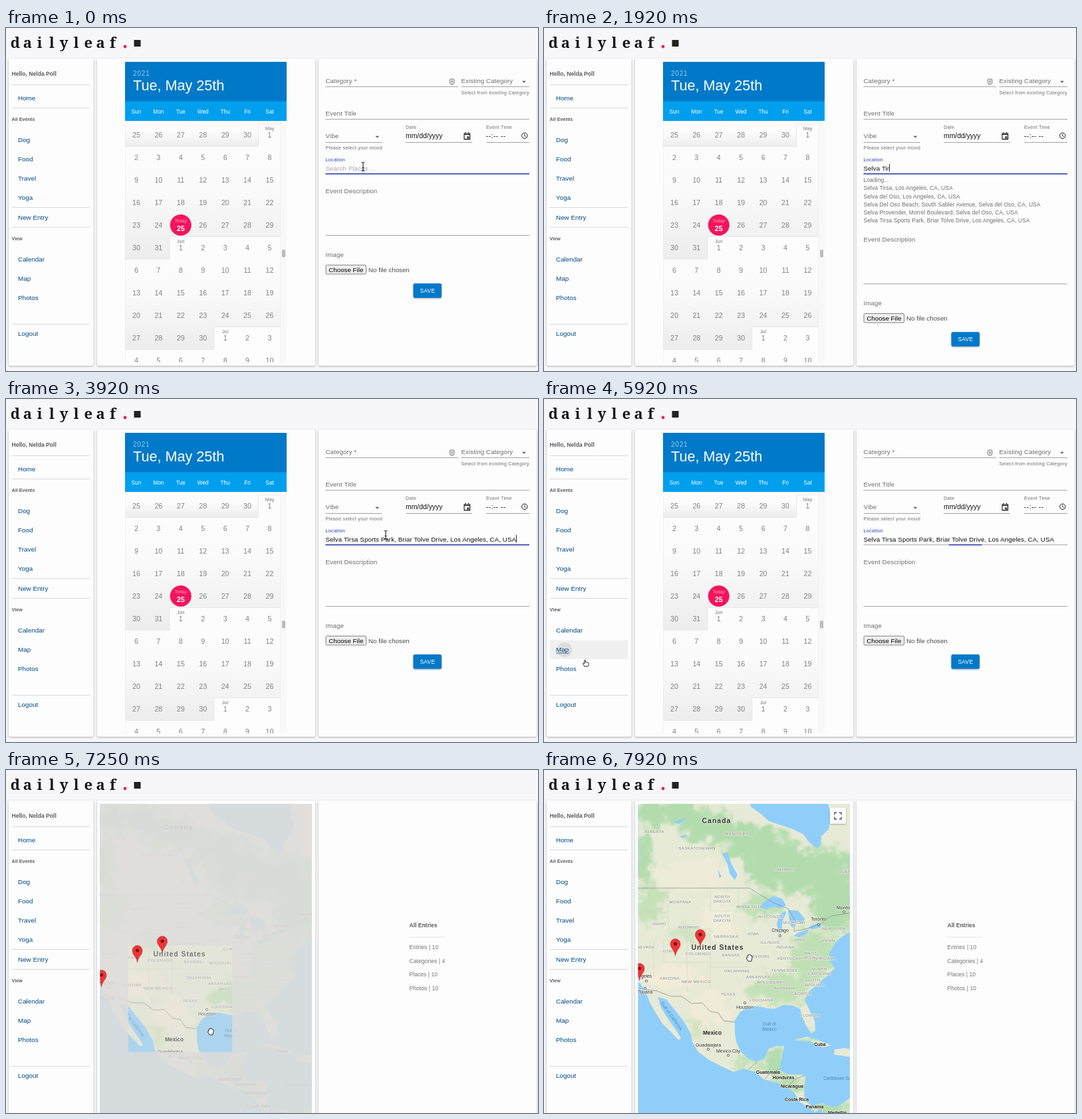
These frames come from a looping animation (800x517 px, 8 s). An HTML page:

```html
<!DOCTYPE html>
<html lang="en">
<head>
<meta charset="utf-8">
<title>Event diary</title>
<style>
html, body { margin: 0; width: 100%; height: 100%; overflow: hidden; background: #f7f7f9; }
svg { display: block; width: 100vw; height: 100vh; font-family: "Liberation Sans", Arial, sans-serif; }
text { white-space: pre; }
.panel { fill: #fdfdfe; filter: drop-shadow(0 1px 1.5px rgba(0,0,0,.3)); }
.halo text { paint-order: stroke; stroke: #f4f5e8; stroke-opacity: .75; stroke-width: 1.6px; stroke-linejoin: round; }
.body { letter-spacing: .0094em; }
.help { letter-spacing: .033em; }
</style>
</head>
<body>
<svg id="stage" viewBox="0 0 800 517" preserveAspectRatio="none"></svg>
<script>
const GREY = '#6e6e70', LINK = '#004a80', BLUE = '#0079c8', FOCUS = '#303fb0', SEA = '#90cefa';

// ---------- drawing helpers ----------
const text = (x, y, s, size, fill = GREY, extra = '') =>
  `<text x="${x}" y="${y}" font-size="${size}" fill="${fill}" ${extra}>${s}</text>`;
const rect = (x, y, w, h, fill, extra = '') =>
  `<rect x="${x}" y="${y}" width="${w}" height="${h}" fill="${fill}" ${extra}/>`;
const line = (x1, x2, y, stroke = '#8e8e8e', w = .8) =>
  `<path d="M${x1} ${y}H${x2}" stroke="${stroke}" stroke-width="${w}"/>`;
const path = (d, fill = 'none', extra = '') => `<path d="${d}" fill="${fill}" ${extra}/>`;
const group = (id, s, extra = '') => `<g id="${id}" ${extra}>${s}</g>`;
const body = (x, y, s, fill = GREY) => text(x, y, s, 9.73, fill, 'class="body"');
const help = (x, y, s, extra = '') => text(x, y, s, 7.3, GREY, 'class="help" ' + extra);
const MID = 'text-anchor="middle"', BOLD = 'font-weight="700"';

// ---------- header and side menu ----------
function header() {
  const word = [...'dailyleaf'].map((c, i) =>
    text(14 + 18.3 * i, 30, c, 22, '#161616', `${MID} ${BOLD} font-family="Noto Serif, serif"`)).join('');
  return word + '<circle cx="179" cy="28" r="2.4" fill="#f0204f"/>' + rect(192.5, 18, 10, 10, '#222');
}

function menu() {
  const links = { Home: 108.5, Dog: 171.5, Food: 200.8, Travel: 230, Yoga: 259.2, 'New Entry': 288.7,
    Calendar: 352, Map: 381.2, Photos: 410.3, Logout: 464.3 };
  return rect(8.5, 363.5, 118, 28.5, '#000', 'id="mapRow"') + rect(8.5, 392, 118, 34, '#000', 'id="photoRow"') +
    '<circle id="ripple" cx="31" cy="378" fill="#000"/>' +
    text(8.5, 71.7, 'Hello, Nelda Poll', 8.6, '#5c5c5e', BOLD) +
    text(8.5, 140.3, 'All Events', 7.2, '#5c5c5e', BOLD) + text(8.5, 320, 'View', 7.2, '#5c5c5e', BOLD) +
    [85.5, 120.5, 270.5, 300.5, 446.5].map(y => line(8.5, 126.5, y, '#d9d9db', 1)).join('') +
    Object.entries(links).map(([s, y]) => text(18, y, s, 9.9, LINK)).join('') +
    group('mapLine', line(18, 37.5, 383, LINK));
}

// ---------- calendar ----------
function calendar() {
  const col = c => 179 + 33.43 * c, mid = c => col(c) + 16.9, row = r => 144.5 + 34 * r;
  const L = 179, R = 413, B = 504;
  const shapes = [
    `M${L} 140H${R}V${row(0)}H${col(6)}V${row(1)}H${L}Z`,
    `M${col(6)} ${row(0)}H${R}V${row(5)}H${col(2)}V${row(6)}H${L}V${row(1)}H${col(6)}Z`,
    `M${col(2)} ${row(5)}H${R}V${row(9)}H${col(4)}V${row(10)}H${L}V${row(6)}H${col(2)}Z`,
    `M${col(4)} ${row(9)}H${R}V560H${L}V${row(10)}H${col(4)}Z`];
  let s = shapes.map((d, i) => path(d, i < 3 ? 'url(#month)' : '#fdfdfe', 'stroke="#e6e6e8" stroke-width=".8"')).join('');
  for (let i = 0; i < 77; i++) {
    const r = i / 7 | 0, c = i % 7, d = new Date(2021, 3, 25 + i), y = row(r) + 17;
    if (i == 30) {
      s += `<circle cx="${mid(c)}" cy="${y - .5}" r="16" fill="#f5145c"/>` +
        text(mid(c), y - 5, 'Today', 6.8, '#ff9dbb', MID) + text(mid(c), y + 8, 25, 10.8, '#fff', `${MID} ${BOLD}`);
      continue;
    }
    if (d.getDate() == 1) s += text(mid(c), y - 8, ['May', 'Jun', 'Jul'][d.getMonth() - 4], 7.2, '#777', MID);
    s += text(mid(c), y + 3.8, d.getDate(), 10.7, '#818183', MID);
  }
  const days = ['Sun', 'Mon', 'Tue', 'Wed', 'Thu', 'Fri', 'Sat'];
  return `<g clip-path="url(#calClip)">${s}${rect(R, 140, 9, B - 140, '#f8f8f9')}</g>` +
    rect(415, 334, 5, 11.5, '#bcbcbe', 'rx="1.5"') +
    rect(L, 51, 243, 60, BLUE, 'rx="1"') + rect(L, 110.5, 243, 29.5, '#009fee') +
    text(191, 72.3, 2021, 10, '#9accec', 'letter-spacing=".8"') + text(191, 94, 'Tue, May 25th', 21.6, '#fff') +
    days.map((d, i) => text(mid(i), 129, d, 8.3, '#fff', MID)).join('');
}

// ---------- entry form ----------
const PLACE = 'Selva Tirsa Sports Park, Briar Tolve Drive, Los Angeles, CA, USA';
const HINTS = ['Selva Tirsa, Los Angeles, CA, USA', 'Selva del Oso, Los Angeles, CA, USA',
  'Selva Del Oso Beach, South Sabler Avenue, Selva del Oso, CA, USA',
  'Selva Provender, Morrel Boulevard, Selva del Oso, CA, USA', PLACE];
const LINE = 12.2;

function form() {
  const arrow = (x, y) => path(`M${x - 3} ${y - 1.5}h6l-3 3z`, '#666');
  const hint = (s, i) => text(480.5, 244.5 - LINE + LINE * i, s, 8.5, GREY, 'letter-spacing=".07"');
  return body(480.5, 83, 'Category *') + line(480.5, 680, 88.5) +
    rect(667.7, 77, 6, 7.5, 'none', 'rx="1" stroke="#666"') + rect(670, 79, 1.4, 3.6, '#666') +
    body(684.5, 83, 'Existing Category') + line(684.5, 787, 88.5) + arrow(779, 81.3) +
    help(684.5, 99.8, 'Select from existing Category') +
    body(480.5, 131.5, 'Event Title') + line(480.5, 787, 137.5) +
    body(480.5, 166, 'Vibe') + line(480.5, 565.5, 172.5) + arrow(558.3, 164.3) +
    help(480.5, 183, 'Please select your mood') +
    help(601, 152, 'Date') + text(601, 166, 'mm/dd/yyyy', 10.4, '#111') + line(601, 701, 172.5) +
    path('M689 159h8.6v8.6h-8.6zM689 160.5h8.6M691 157v2M695.6 157v2M693.8 164h2v2h-2z', 'none', 'stroke="#111" stroke-width="1.1"') +
    help(722, 152, 'Event Time') + text(722, 165.5, '--:-- --', 10, '#111', 'letter-spacing=".5"') + line(722, 787, 172.5) +
    '<circle cx="779.8" cy="162.3" r="4.2" fill="none" stroke="#111"/>' +
    path('M779.8 159.8v2.8l1.9 1.2', 'none', 'stroke="#111" stroke-width=".9"') +
    help(480.5, 200.5, 'Location', 'id="label"') + line(480.5, 787, 219.8) +
    rect(-153.25, -.75, 306.5, 1.5, FOCUS, 'id="focus"') +
    group('input', body(480.5, 214.5, '')) + rect(0, 205, .9, 11.5, '#111', 'id="caret"') +
    group('loading', hint('Loading...', 0)) + group('list', HINTS.map((s, i) => hint(s, i)).join('')) +
    group('low', body(480.5, 249, 'Event Description') + line(480.5, 787, 312.5) +
      body(480.5, 344.5, 'Image') + rect(481, 357.3, 60.5, 13.6, '#efefef', 'rx="1.5" stroke="#666" stroke-width=".8"') +
      text(485.3, 367.6, 'Choose File', 9.75, '#000') + text(545, 367.6, 'No file chosen', 9.75, '#4a4a4a') +
      rect(612.5, 385, 42.5, 21.8, BLUE, 'rx="2.4" style="filter:drop-shadow(0 1px 1px rgba(0,0,0,.35))"') +
      text(633.9, 399, 'SAVE', 8.5, '#fff', MID + ' letter-spacing=".2"'));
}

// ---------- map ----------
const LAND = 'M130 40H304L312 56 326 66 338 77 356 83 374 89 390 97 398 108 410 118 416 114 417 100 428 89 432 70 424 40H470V238L448 251 438 260 ' +
  '429 276 430 288 437 299 425 311 410 324 398 334 392 346 399 362 407 378 408 393 402 397 394 385 388 371 385 360 374 355 360 354 ' +
  '347 360 335 359 322 356 308 356 295 365 287 377 287 396 289 410 296 425 308 436 320 440 332 435 338 420 350 416 361 416 ' +
  '358 430 354 451';
const SOUTH = 'L364 458 393 460 391 488 393 499 403 507 418 502 433 508 442 507 470 488V540H425L418 510 408 516 398 508 384 500 ' +
  '377 487 366 477 345 470 330 466 318 455 300 450 285 455 268 447 250 438 232 425 223 410 221 398 211 380 197 362 184 346 ' +
  '171 342 176 358 187 376 199 393 206 404 202 407 192 396 178 382 168 366 160 352 153 335 145 322 130 312Z' +
  'M376 407L395 402 412 407 432 415 419 418 400 409ZM437 421L454 419 470 424V434L436 429Z';
const LAKES = 'M322 208L332 198 345 190 358 194 364 204 355 209 345 206 334 210ZM353 247L350 232 353 220 362 212 364 216 358 230 358 245Z' +
  'M367 211L382 212 392 224 388 234 380 226 374 238 370 233ZM375 250L383 245 398 240 396 246 384 252ZM397 238L405 233 418 231 416 237 404 240Z' +
  'M268 126L276 124 281 140 291 158 287 166 279 156 276 142ZM261 150L267 160 264 163ZM196 78L216 71 202 82ZM204 100L216 97 209 103Z';
const STATES = 'ALBERTA 166 95;MANITOBA 290 98;SASKATCHEWAN 230 120;ONTARIO 362 152;QUEB 452 155;MONTANA 205 201;NORTH 268 193;' +
  'DAKOTA 268 200;SOUTH 268 222;DAKOTA 268 229;MINNESOTA 309 208;WISCONSIN 341 223;IDAHO 173 234;WYOMING 218 239;' +
  'NEBRASKA 274 253;IOWA 315 249;MICHIGAN 376 232;ILLINOIS 340 262;OHIO 385 258;PENN 428 259;NEW YORK 436 241;NEVADA 153 269;' +
  'UTAH 188 275;COLORADO 232 279;KANSAS 281 281;MISSOURI 322 283;INDIANA 363 269;WEST 401 278;VIRGINIA 401 285;KENTUCKY 369 286;' +
  'VIRGINIA 423 286';
const STATES2 = 'ARIZONA 189 316;NEW MEXICO 229 321;OKLAHOMA 290 305;ARKANSAS 322 314;TENNESSEE 362 304;NORTH 414 302;' +
  'CAROLINA 414 309;MISSISSIPPI 341 322;ALABAMA 362 331;SOUTH 404 319;CAROLINA 404 326;GEORGIA 387 339;TEXAS 277 340;' +
  'LOUISIANA 327 349;FLORIDA 400 372';
const CITIES = 'Chicago 355 244 6;Toronto 413 227 6;Montre 451 210 4;Houston 302 360 -9;Mexico City 277 426 4;Guadalajara 247 417 4;' +
  'Tijuana 152 337 -8;geles 154 313 5';
const NATIONS = 'Cuba 415 416;Guatemala 337 458;Honduras 360 466;Nicaragua 373 479;Costa Rica 380 499;Panama 407 510;Medellín 441 519';

// Each entry reads "name x y [dot offset]".
const places = (list, draw) => list.split(';').map(e => {
  const [, name, x, y, dot] = e.match(/^(\D+) (\d+) (\d+) ?(-?\d+)?$/);
  return draw(name, +x, +y, dot);
}).join('');

function pin(x, y) {
  return path(`M${x} ${y}C${x - 1} ${y - 9} ${x - 7.5} ${y - 11} ${x - 7.5} ${y - 18}a7.5 7.5 0 0 1 15 0C${x + 7.5} ${y - 11} ${x + 1} ${y - 9} ${x} ${y}Z`,
    '#ee3436', 'stroke="#c4282a" stroke-width=".6"') + `<circle cx="${x}" cy="${y - 18}" r="2.6" fill="#7d1214"/>`;
}

function map() {
  const blob = (x, y, rx, ry, fill = '#b3dcae') => `<ellipse cx="${x}" cy="${y}" rx="${rx}" ry="${ry}" fill="${fill}"/>`;
  const greens = blob(185, 62, 60, 20) + blob(255, 88, 50, 20) + blob(320, 112, 55, 26) + blob(390, 150, 85, 36) +
    blob(150, 130, 14, 45) + blob(160, 205, 20, 30, '#c6e1b8') + blob(440, 205, 40, 40) + blob(330, 205, 26, 18, '#c0e0b6') +
    blob(405, 280, 38, 38, '#bfe0b5') + blob(355, 330, 48, 22, '#c3e1b7') + blob(215, 250, 25, 14, '#d0e4c2') +
    blob(228, 388, 12, 26, '#d3e3be') + blob(350, 440, 25, 18) + blob(372, 475, 28, 16) + blob(310, 443, 28, 10, '#c3e0b5') +
    blob(430, 512, 35, 14) + blob(392, 408, 30, 6) +
    blob(225, 158, 58, 24, '#eeecd9') + blob(265, 225, 30, 30, '#f0edda') + blob(195, 312, 45, 22, '#f1ebd8') + blob(252, 360, 26, 28, '#f0ebd8');
  const state = (s, x, y) => text(x, y, s, 6.2, '#82868a', `${MID} letter-spacing=".35"`);
  const city = (s, x, y, dot) => text(x, y, s, 7, '#333', MID) +
    `<circle cx="${x}" cy="${y + +dot}" r="1.6" fill="#fff" stroke="#444" stroke-width=".8"/>`;
  const sea = (x, y, s, extra = '') => text(x, y, s, 6.8, '#4e86b8', `${MID} ${extra}`);
  return rect(130, 40, 340, 500, SEA) +
    `<clipPath id="landClip">${path(LAND + SOUTH)}</clipPath>` +
    `<g clip-path="url(#landClip)">${rect(130, 40, 340, 500, '#e7ead6')}<g filter="url(#terrain)">${greens}</g></g>` +
    path(LAKES, SEA) +
    path('M130 178H309L325 188 345 200 367 209 378 228 376 243 396 239 416 232 432 220 470 214', 'none', 'stroke="#8d9290" stroke-width=".8"') +
    path('M153 331L170 333 190 341 207 341 222 352 238 351 250 364 262 366 270 378 287 380M308 451L320 440M332 466L340 457 354 451M366 477L378 466 393 460', 'none', 'stroke="#8d9290" stroke-width=".8"') +
    path('M142 214H187V240H250M187 178V214M250 178V212H292V178M250 240V290M215 250V335M180 255V290H300M165 255V310M250 290V330M250 297H312', 'none', 'stroke="#d2d4c4" stroke-width=".6"') +
    `<g class="halo">${places(STATES, state)}${places(STATES2, state)}${places(CITIES, city)}` +
    places(NATIONS, (s, x, y) => text(x, y, s, 7, '#222', `${MID} ${BOLD}`)) +
    text(259.5, 79.5, 'Canada', 10.5, '#333', `${MID} ${BOLD} letter-spacing="1"`) +
    text(261, 270.5, 'United States', 10.5, '#333', `${MID} ${BOLD} letter-spacing=".9"`) +
    text(253, 399, 'Mexico', 8.3, '#222', `${MID} ${BOLD}`) + '</g>' +
    sea(190, 372, 'Gulf of California', 'transform="rotate(54 190 372)"') +
    sea(339, 385, 'Gulf of') + sea(339, 393, 'Mexico') + sea(441, 467, 'Caribbean Se');
}

function mapPage() {
  return `<g id="mapPane" clip-path="url(#mapClip)">${group('land', map())}` +
    path('M142 51H460V517H142ZM184 265V425H340V265Z', '#dedddb', 'id="veil" fill-rule="evenodd"') +
    rect(184, 265, 156, 160, '#dedddb', 'id="tile"') +
    group('pins', pin(197.5, 280) + pin(235, 266) + pin(143.5, 317)) +
    group('full', rect(430, 57, 24, 24, '#fff', 'rx="1.5" style="filter:drop-shadow(0 1px 1px rgba(0,0,0,.3))"') +
      path('M437 67.5V64.3h3.2M443.8 64.3H447v3.2M447 70.8V74h-3.2M440.2 74H437v-3.2', 'none', 'stroke="#555" stroke-width="1.5"')) + '</g>' +
    text(606.5, 237.3, 'All Entries', 8.5, '#5f5f61', BOLD) + line(606, 660, 252, '#e6e6e8', 1) +
    ['Entries | 10', 'Categories | 4', 'Places | 10', 'Photos | 10'].map((s, i) =>
      text(606.5, 270.2 + 20.6 * i, s, 8.5, '#747476', 'letter-spacing=".07"')).join('');
}

// ---------- pointers, centred on their middle ----------
const outline = 'stroke="#111" stroke-width=".9" stroke-linejoin="round"';
const POINTERS = {
  beam: path('M-2.5-6.5Q0-6.5 0-5V5Q0 6.5-2.5 6.5M2.5-6.5Q0-6.5 0-5M0 5Q0 6.5 2.5 6.5M-1.5 1.5H1.5', 'none', 'stroke="#222" stroke-width="1.1"'),
  arrow: path('M-3-6V5L-.6 2.8 1 6.4 2.7 5.6 1.2 2.2H4.5Z', '#111', 'stroke="#fff" stroke-width=".7"'),
  hand: path('M-2.2 5L-4.4 1.2Q-4.6-.2-3.2 0L-2.2 1V-4Q-1.4-5.6-.6-4V-1Q.4-2 1-.8 2-1.6 2.6-.4 3.8-1 4.2.4V2.6L3.2 5Z', '#fff', outline),
  grab: path('M-2 5.2L-4.6.8Q-4.4-.8-3-.2L-3.4-3Q-2.6-4.4-1.8-3L-1.2-4.6Q-.2-5.6.4-4.2 1.6-5.2 2.2-3.6L2.4-2.6Q4-3.6 4.2-1.8L3.4 3 2.8 5.2Z', '#fff', outline)
};

document.getElementById('stage').innerHTML = `<defs>
  <linearGradient id="month" x2="0" y2="1"><stop stop-color="#fdfdfe"/><stop offset=".45" stop-color="#fbfbfc"/><stop offset="1" stop-color="#ededee"/></linearGradient>
  <filter id="terrain" x="-20%" y="-20%" width="140%" height="140%" color-interpolation-filters="sRGB">
    <feGaussianBlur stdDeviation="5" result="blur"/><feTurbulence type="fractalNoise" baseFrequency=".05" numOctaves="3" seed="4"/>
    <feDisplacementMap in="blur" scale="45" xChannelSelector="R" yChannelSelector="G"/></filter>
  <clipPath id="calClip">${rect(179, 140, 243, 364)}</clipPath><clipPath id="mapClip">${rect(141.5, 51, 318.5, 470)}</clipPath></defs>` +
  rect(0, 0, 800, 517, '#f7f7f9') +
  [[4, 127.5], [137, 328], [470, 328]].map(([x, w]) => rect(x, 46, w, 463, '', 'rx="2" class="panel"')).join('') +
  header() + menu() + group('diary', calendar() + form()) + group('world', mapPage()) +
  Object.entries(POINTERS).map(([id, s]) => group(id, s)).join('');

// ---------- motion ----------
const $ = id => document.getElementById(id);
const set = (id, name, v) => $(id).setAttribute(name, v);
const show = (id, on) => set(id, 'visibility', on ? 'inherit' : 'hidden');
const ramp = (t, a, b) => Math.min(1, Math.max(0, (t - a) / (b - a)));
const smooth = u => u * u * (3 - 2 * u);
const within = (t, a, b) => t >= a && t < b;

const KEYS = [420, 500, 590, 670, 750, 920, 1080, 1420, 1750];
const PICK = 2830, BLUR = 5830, LEAVE = 6080;
// time, x, y, pointer used from then on
const MOVES = [[0, 537, 209, 'beam'], [420, 537, 209, ''], [2170, 537, 209, 'beam'], [2300, 548, 240, 'hand'], [2500, 570, 291, 'hand'],
  [PICK, 570, 291, 'beam'], [3500, 570, 291, 'beam'], [3840, 571, 205, 'beam'], [4330, 571, 205, 'arrow'], [5000, 50, 372, 'hand'],
  [5080, 36, 379, 'hand'], [5750, 36, 379, 'hand'], [5920, 63, 398, 'hand'], [6170, 68, 402, 'hand'], [6500, 227, 422, 'hand'],
  [6750, 290, 402, 'grab'], [7000, 308, 394, 'grab'], [7330, 308, 394, 'grab'], [7920, 309, 283, 'grab'], [8000, 309, 283, 'grab']];

function pointer(t) {
  const i = MOVES.findLastIndex(m => m[0] <= t), a = MOVES[i], b = MOVES[i + 1] || a;
  const u = a === b ? 0 : smooth(ramp(t, a[0], b[0]));
  for (const id in POINTERS) show(id, id == a[3]);
  if (a[3]) set(a[3], 'transform', `translate(${a[1] + (b[1] - a[1]) * u} ${a[2] + (b[2] - a[2]) * u})`);
}

function diary(t) {
  const count = KEYS.filter(k => k <= t).length, input = $('input').firstChild;
  const value = t >= PICK ? PLACE : PLACE.slice(0, count);
  input.textContent = value || 'Search Places ...';
  input.setAttribute('fill', value ? '#111' : '#a9a9ab');
  set('caret', 'x', 480.5 + (value ? input.getComputedTextLength() : 0));
  const since = t - (t >= PICK ? PICK : KEYS[Math.max(0, count - 1)]);
  show('caret', value && t < BLUR && since % 1000 < 500);

  const loading = within(t, 500, 1580) || within(t, 1920, 2000), list = within(t, 1250, PICK);
  show('loading', loading);
  show('list', list);
  set('list', 'transform', `translate(0 ${loading ? LINE : 0})`);
  set('low', 'transform', `translate(0 ${LINE * (loading + 5 * list)})`);
  set('focus', 'transform', `translate(633.75 219.8) scale(${(1 - ramp(t, BLUR, BLUR + 200)) ** 3} 1)`);
  set('label', 'fill', t < 5950 ? FOCUS : GREY);
}

function world(t) {
  const fade = ramp(t, 7270, 7550), drift = 10 * (1 - smooth(ramp(t, 7500, 7850)));
  show('mapPane', t >= 6670);
  show('pins', t >= 7080);
  show('full', t >= 7500);
  set('land', 'transform', `translate(0 ${drift})`);
  set('pins', 'transform', `translate(0 ${drift})`);
  set('veil', 'opacity', t < 7080 ? 1 : .9 * (1 - fade));
  set('tile', 'opacity', (1 - .62 * ramp(t, 7080, 7250)) * (1 - fade));
}

function draw(t) {
  const away = t >= LEAVE;
  show('diary', !away);
  show('world', away);
  document.querySelectorAll('.panel').forEach(p => p.setAttribute('height', away ? 490 : 463));
  set('mapRow', 'opacity', .05 * ramp(t, 5750, 5900) * (1 - ramp(t, 6480, 6650)));
  set('photoRow', 'opacity', .03 * ramp(t, 5930, 6080) * (1 - ramp(t, 6450, 6600)));
  set('ripple', 'r', 3 + 11 * ramp(t, BLUR, 5950));
  set('ripple', 'opacity', t < BLUR ? 0 : .08 * (1 - ramp(t, 5950, 6400)));
  show('mapLine', within(t, 5170, 6400));
  if (away) world(t); else diary(t);
  pointer(t);
}

function tick() {
  draw(performance.now() % 8000);
  requestAnimationFrame(tick);
}
tick();
</script>
</body>
</html>
```
